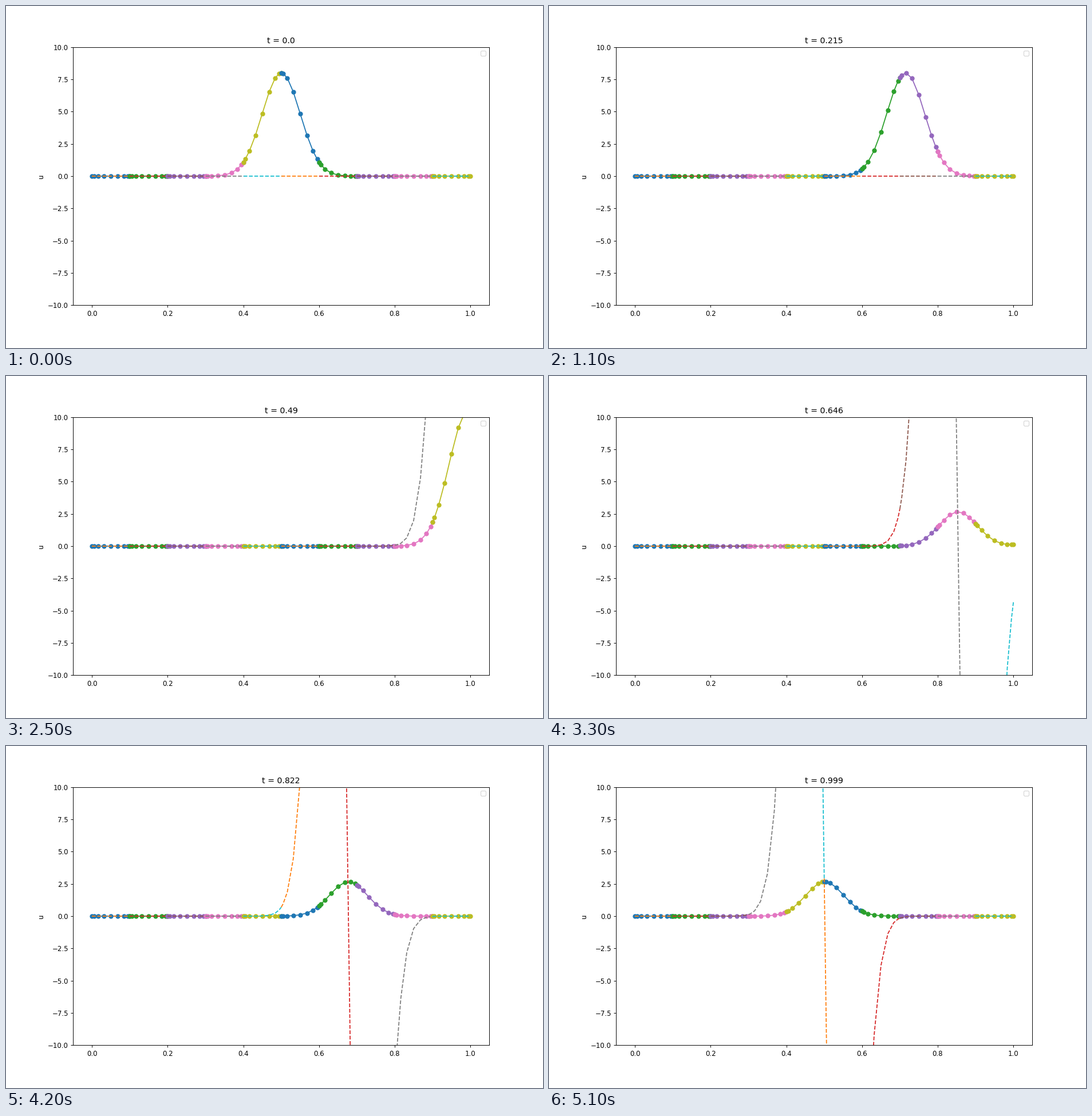
Animation, 938 px wide and 597 px high, one loop 5.2 s. Source, as a matplotlib script:

```python
import numpy as np
import matplotlib.pyplot as plt
from matplotlib.animation import FuncAnimation

FRAMES = 52
INTERVAL = 100
TIME_STEP = 0.019581   # simulated time per frame
ELEMENTS = 10
ORDER = 8
AMPLITUDE = 8.0
START = 0.5
REFLECTION = 1 / 3     # share of the pulse sent back at x = 1


def lobatto_nodes(order):
    """Legendre-Gauss-Lobatto points scaled to [0, 1]."""
    inner = np.polynomial.legendre.Legendre.basis(order).deriv().roots()
    points = np.concatenate(([-1.0], np.sort(inner.real), [1.0]))
    return (points + 1) / 2


def bell(d):
    return np.exp(-200 * d**2)


def pulse(x, t):
    """Pulse moving right plus its weaker echo moving left."""
    incident = bell(x - START - t)
    echo = bell(x - (2 - START) + t)
    return AMPLITUDE * (incident + REFLECTION * echo)


def echo_slope(x, t):
    """Twice the spatial derivative of the echo."""
    d = x - (2 - START) + t
    return 2 * AMPLITUDE * REFLECTION * -400 * d * bell(d)


# 938 x 597 pixels
fig, ax = plt.subplots(figsize=(11.0354, 7.0236), dpi=85)
fig.subplots_adjust(left=0.125, right=0.9, bottom=0.125, top=0.88)
ax.set_xlim(-0.05, 1.05)
ax.set_ylim(-10, 10)
ax.set_ylabel("u")
title = ax.set_title("t = 0.0")

nodes = lobatto_nodes(ORDER)
cells = []
for k in range(ELEMENTS):
    x = (k + nodes) / ELEMENTS
    solid, = ax.plot(x, pulse(x, 0), "o-", color=f"C{2 * k % 10}")
    dashed, = ax.plot(x, echo_slope(x, 0), "--", color=f"C{(2 * k + 1) % 10}")
    cells.append((x, solid, dashed))
ax.legend([], [], loc="upper right")


def update(frame):
    t = frame * TIME_STEP
    for x, solid, dashed in cells:
        solid.set_ydata(pulse(x, t))
        dashed.set_ydata(echo_slope(x, t))
    title.set_text(f"t = {round(t, 3)}")
    return [title]


anim = FuncAnimation(fig, update, frames=FRAMES, interval=INTERVAL,
                     repeat=True, repeat_delay=0, blit=False)
plt.show()
```
